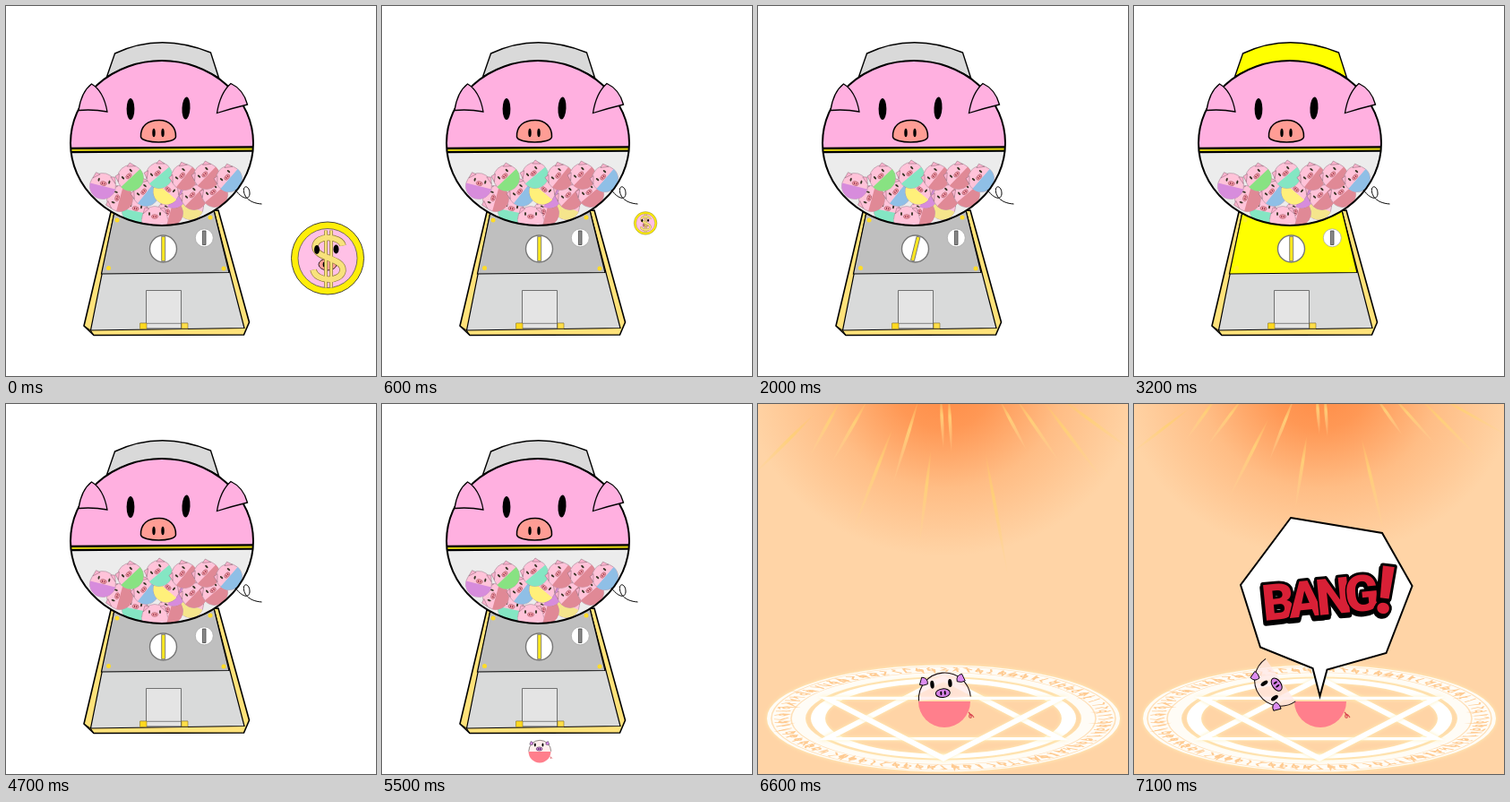
Recreate the animation shown at these times as an HTML page with a canvas. Size 413 px wide and 413 px high, loop 8600 ms.

```html
<!DOCTYPE html>
<html lang="en">
<head>
<meta charset="utf-8">
<title>Piggy capsule machine</title>
<style>
html, body { margin: 0; width: 100%; height: 100%; overflow: hidden; background: #fff; }
canvas { display: block; width: 100vw; height: 100vh; }
</style>
</head>
<body>
<canvas id="stage" width="413" height="413"></canvas>
<script>
const ctx = document.getElementById('stage').getContext('2d');
const SIZE = 413, LOOP = 8600, STEP = 100, TAU = Math.PI * 2;
const INK = '#000', PINK = '#ffb0e0', GOLD = '#ffe27a', LIT = '#ffff00';

function paint(fill, stroke, width = 1) {
  if (fill) { ctx.fillStyle = fill; ctx.fill(); }
  if (stroke) { ctx.strokeStyle = stroke; ctx.lineWidth = width; ctx.stroke(); }
}

function oval(x, y, rx, ry, fill, stroke, width, tilt = 0) {
  ctx.beginPath();
  ctx.ellipse(x, y, rx, ry, tilt, 0, TAU);
  paint(fill, stroke, width);
}

function poly(points, fill, stroke, width) {
  ctx.beginPath();
  points.forEach(([x, y]) => ctx.lineTo(x, y));
  ctx.closePath();
  paint(fill, stroke, width);
}

function box(x, y, w, h, fill, stroke, width) {
  ctx.beginPath();
  ctx.rect(x, y, w, h);
  paint(fill, stroke, width);
}

function shape(d, fill, stroke, width) {
  const path = new Path2D(d);
  if (fill) { ctx.fillStyle = fill; ctx.fill(path); }
  if (stroke) { ctx.strokeStyle = stroke; ctx.lineWidth = width; ctx.stroke(path); }
}

function placed(x, y, angle, scale, draw) {
  ctx.save();
  ctx.translate(x, y);
  ctx.rotate(angle);
  ctx.scale(scale, scale);
  draw();
  ctx.restore();
}

function seeded(seed) {
  return () => (seed = (seed * 16807) % 2147483647) / 2147483647;
}

// ---------- Machine ----------

const ROSE = '#e08996', TEAL = '#84e6c3', BLUE = '#8fbfe6', VIOLET = '#d78cdc';
const CAPSULES = [
  [144, 229, TEAL, 0.2], [206, 224, '#f5e58c', 0.4], [183, 231, ROSE, -1.3],
  [166, 238, '#ffc3d9', 0], [127, 215, ROSE, -1.3], [156, 209, BLUE, -0.9],
  [187, 211, VIOLET, -1.1], [179, 207, '#fff07a', 0.7], [210, 213, ROSE, -0.8],
  [233, 210, ROSE, -0.7], [108, 201, VIOLET, 0.25], [139, 192, '#88e282', -0.75],
  [171, 189, TEAL, -0.7], [199, 191, ROSE, -0.9], [224, 190, ROSE, -0.8],
  [249, 193, BLUE, -0.85]
];

function capsule([x, y, color, angle]) {
  placed(x, y, angle, 1, () => {
    const r = 14.5;
    oval(0, 0, r, r, '#ffc3d9', '#9a8390', 0.5);
    for (const s of [-1, 1]) {
      poly([[s * 13, -6], [s * 11, -13], [s * 6, -12]], '#ffb3cf', '#8a6c78', 0.5);
      oval(s * 6, -6, 1, 2.1, '#332');
    }
    oval(0, -3, 3.6, 2.3, '#f79aa4', '#a05a68', 0.6);
    oval(-1.2, -3, 0.5, 1, '#613');
    oval(1.2, -3, 0.5, 1, '#613');
    ctx.beginPath();
    ctx.arc(0, 0, r, 0, Math.PI);
    paint(color);
  });
}

function base(lit) {
  poly([[117, 230], [87, 357], [98, 367.5], [265.5, 367], [271.5, 353], [237, 228]], GOLD, INK, 1.6);
  poly([[121, 230], [94.5, 362], [266, 359.5], [232, 228]], '#d9dada', INK, 1.2);
  poly([[121, 230], [106.5, 299], [249, 297.5], [232, 228]], lit ? LIT : '#bfbfbf', INK, 1.2);
  for (const [x, y] of [[124, 239], [228, 236], [114.5, 292.5], [243, 293]])
    oval(x, y, 2.5, 2.5, lit ? '#fff02a' : '#ffdc28');
  shape('M87 357L94.5 362L98 367.5', null, INK, 0.9);

  box(156.5, 317.5, 39, 42.5, '#e4e4e4', '#555', 0.8);
  shape('M150 354.3H203M150 360.2H203', null, '#555', 0.7);
  box(149.5, 354, 7.5, 6.5, '#ffd91f', '#8a7420', 0.6);
  box(196, 354, 7, 6, '#ffdf4a', '#8a7420', 0.6);
}

function knob(angle) {
  oval(175.5, 271, 15, 15, '#fff', '#777', 1.4);
  placed(175.7, 271, angle, 1, () => box(-2, -13.7, 4, 27.4, '#ffe81f', '#777', 0.9));
  oval(221.3, 258.8, 10, 10, '#fff', '#aaa', 0.8);
  box(219.4, 251, 3.6, 15.5, '#8a8a8a', '#444', 0.8);
}

function globe() {
  ctx.save();
  ctx.beginPath();
  ctx.ellipse(174, 153, 102, 92, 0, 0, TAU);
  ctx.clip();
  box(70, 58, 210, 102, PINK);
  box(70, 160, 210, 90, '#ececec');
  CAPSULES.forEach(capsule);
  shape('M70 161L280 159.5', null, INK, 6.4);
  shape('M70 161L280 159.5', null, '#d8cc10', 2.2);
  ctx.restore();
  oval(174, 153, 102, 92, null, INK, 2);
}

function machine(lit, turn) {
  base(lit);
  knob(turn);
  shape('M112.5 79L121.5 53Q172 29 228.5 52L237.5 80Q174 44 112.5 79Z', lit ? LIT : '#d9d9d9', INK, 1.4);
  globe();
  shape('M81 116.5Q84 96 95.5 87Q109 95 113 118Q97 115 81 116.5Z', PINK, INK, 1.3);
  shape('M235.5 119.5Q239 97 251 86.5Q265 93 269.5 110Q253 114 235.5 119.5Z', PINK, INK, 1.3);
  oval(139, 115, 4.4, 12, INK);
  oval(201, 114, 4.5, 12.6, INK, null, 0, 0.05);
  shape('M150.5 146C150 134 158 127.5 171 127.5C182 127.5 190 135 189.5 146C189 154 152 154 150.5 146Z', '#ff9d95', INK, 1.5);
  oval(165, 141.5, 1.7, 4.8, INK);
  oval(175, 141.5, 1.7, 4.8, INK);
  shape('M256 205C262 214 271 218 272 210C272.5 203 267 199 265.5 204C264.5 211 270 220 285.5 221', null, INK, 1);
}

function dollar(color, grow) {
  shape('M17 -14C15 -25 -13 -27 -14 -13C-14 1 18 -1 17 14C15 27 -13 27 -16 13', null, color, 6 + grow);
  shape('M-2 -31V33M4 -31V33', null, color, 2.4 + grow);
}

function coin(u) {
  const r = 41 - 42 * u;
  if (r <= 0) return;
  const x = 359 - 138 * Math.pow(u, 1.86);
  const y = 281.5 - 23 * u - 107 * u * (1 - u);
  placed(x, y, 0, r / 41, () => {
    oval(0, 0, 40.5, 40.5, '#ffee0a', '#333', 0.9);
    oval(0, 0, 33, 33, '#ffc0e6', '#555', 0.8);
    oval(0, 7, 10, 6.5, '#ff9f98', INK, 0.8);
    oval(-4, 7, 1.4, 3, INK);
    oval(4, 7, 1.4, 3, INK);
    dollar('#8f7a3a', 1.4);
    dollar('#f8e27c', 0);
    oval(-12, -9.5, 3, 5, INK);
    oval(9.5, -10, 3, 5, INK);
  });
}

// ---------- Prize ball, radius 29, lid hinged at its left edge ----------

function lid() {
  ctx.beginPath();
  ctx.arc(28.5, 0, 29, Math.PI, TAU);
  paint('rgba(255,232,230,.72)', null);
  ctx.beginPath();
  ctx.arc(28.5, 0, 29, Math.PI, TAU);
  paint(null, '#1a1012', 1.1);
  shape('M2 -18L5 -26Q12 -25 11 -18Q6 -16 2 -18Z', '#dc8df0', INK, 0.9);
  shape('M53 -18L50 -26Q43 -25 44 -18Q49 -16 53 -18Z', '#dc8df0', INK, 0.9);
  oval(16, -17, 2.2, 4.5, INK);
  oval(36, -17, 2.2, 4.5, INK);
  oval(27, -6.5, 8, 4.8, '#d583e4', INK, 1);
  oval(25, -6.5, 1, 2.4, INK);
  oval(29.4, -6.5, 1, 2.4, INK);
}

function prize(x, y, scale, open) {
  placed(x, y, 0, scale, () => {
    ctx.beginPath();
    ctx.arc(0, 0, 29, 0, Math.PI);
    paint('#ff7f8c');
    shape('M27 12Q31 16 30 18Q27 19 28 15Q30 13 33 18', null, '#d8434e', 1.1);
    placed(-28, -0.5, -open, 1, lid);
  });
}

// ---------- Summoning scene ----------

// Each ray: start x, start y, end x, end y
const RAYS = [
  [62, 12, -8, 82], [92, -4, 58, 58], [122, -4, 82, 66], [150, 28, 106, 142],
  [179, -4, 151, 88], [193, 52, 180, 158], [204, -8, 207, 50], [213, -8, 216, 54],
  [254, 56, 279, 192], [270, -4, 300, 52], [288, -6, 336, 64], [318, -4, 386, 86],
  [338, -6, 420, 54]
];

function ray([x, y, endX, endY]) {
  const len = Math.hypot(endX - x, endY - y);
  placed(x, y, Math.atan2(endY - y, endX - x), 1, () => {
    const fade = ctx.createLinearGradient(0, 0, len, 0);
    fade.addColorStop(0, 'rgba(255,198,105,.15)');
    fade.addColorStop(0.35, 'rgba(255,208,120,.95)');
    fade.addColorStop(1, 'rgba(255,214,150,.1)');
    shape(`M0 0Q${len * 0.4} -3.6 ${len} 0Q${len * 0.4} 3.6 0 0Z`, fade);
  });
}

function sky(reach) {
  ctx.fillStyle = '#ffd4a6';
  ctx.fillRect(0, 0, SIZE, SIZE);
  ctx.save();
  ctx.translate(207, -20);
  ctx.scale(1.15, 1);
  const glow = ctx.createRadialGradient(0, 0, 0, 0, 0, 190);
  glow.addColorStop(0, '#ff8b45');
  glow.addColorStop(0.25, '#ff9855');
  glow.addColorStop(0.6, '#ffbd85');
  glow.addColorStop(1, '#ffd4a6');
  ctx.fillStyle = glow;
  ctx.fillRect(-240, 0, 480, 260);
  ctx.scale(1 / 1.15, reach);
  ctx.translate(-207, 20);
  RAYS.forEach(ray);
  ctx.restore();
}

function rune(rnd) {
  ctx.beginPath();
  ctx.moveTo(-4 + rnd() * 3, -8);
  for (let i = 0; i < 3; i++) ctx.lineTo(rnd() * 10 - 5, rnd() * 16 - 8);
  ctx.lineTo(3, 8);
  if (rnd() > 0.5) ctx.arc(0, 1, 3.5, 0, TAU);
  paint(null, '#ffcb92', 2.3);
}

function circles() {
  const rnd = seeded(77);
  ctx.save();
  ctx.translate(207, 351);
  ctx.scale(1, 0.302);
  ctx.lineJoin = 'miter';
  ctx.shadowColor = '#ffefb8';
  ctx.shadowBlur = 4;
  oval(0, 0, 175.5, 175.5, null, '#fffcf6', 43);
  oval(0, 0, 140, 140, null, '#fff', 16);
  for (const dir of [-1, 1])
    poly([[0, dir * 148], [130, -dir * 75], [-130, -dir * 75]], null, '#fff', 11);
  ctx.shadowBlur = 0;
  oval(0, 0, 192, 192, null, '#ffe0b8', 1.6);
  oval(0, 0, 170, 170, null, '#ffe0b8', 1.6);
  const count = 84;
  for (let i = 0; i < count; i++) {
    const a = i / count * TAU;
    placed(Math.cos(a) * 181, Math.sin(a) * 181, a + Math.PI / 2, 1, () => rune(rnd));
  }
  ctx.restore();
}

// Comic lettering: heavy outline below, then letters overlapping left to right
function shout(text, x, y, size, angle) {
  placed(x, y, angle, 1, () => {
    ctx.font = `900 ${size}px Roboto, "Open Sans", sans-serif`;
    ctx.textAlign = 'left';
    ctx.textBaseline = 'alphabetic';
    ctx.lineJoin = 'round';
    const eachLetter = (draw) => {
      let at = 0;
      for (const ch of text) {
        draw(ch, at);
        at += ctx.measureText(ch).width - 7;
      }
    };
    ctx.strokeStyle = INK;
    ctx.lineWidth = 6;
    eachLetter((ch, at) => {
      ctx.strokeText(ch, at - 1, 3);
      ctx.strokeText(ch, at, 0);
    });
    ctx.fillStyle = '#d82036';
    ctx.lineWidth = 3;
    eachLetter((ch, at) => {
      ctx.strokeText(ch, at, 0);
      ctx.fillText(ch, at, 0);
    });
  });
}

function bang() {
  poly([[175, 127], [277, 144], [310.5, 203], [281.5, 278], [215.5, 296.5],
    [207.5, 326], [199.5, 295], [141, 271.5], [119, 202]], '#fff', INK, 2);
  shout('BANG', 145, 242, 56, -0.1);
  shout('!', 267, 232, 74, 0.13);
}

// ---------- Timeline ----------

function halfTurn(u) {
  const p = 2.3;
  return Math.PI * (u < 0.5 ? Math.pow(2 * u, p) / 2 : 1 - Math.pow(2 - 2 * u, p) / 2);
}

function knobAngle(t) {
  if (t < 900 || t >= 2700) return 0;
  return halfTurn(((t - 900) % 900) / 900);
}

function draw(t) {
  ctx.clearRect(0, 0, SIZE, SIZE);
  if (t < 5600) {
    const lit = (t >= 3200 && t < 3700) || (t >= 4200 && t < 4700);
    ctx.fillStyle = '#fff';
    ctx.fillRect(0, 0, SIZE, SIZE);
    machine(lit, knobAngle(t));
    if (t < 1000) coin(t / 900);
    if (t >= 5200) prize(176, 388 - (5500 - t) * 0.14, 0.43, 0);
    return;
  }
  const u = Math.min(1, Math.max(0, (t - 6500) / 600));
  sky(1 - 0.23 * Math.max(0, (u * 6 - 1) / 5));
  circles();
  prize(208, 332, 1, 125 * Math.pow(u, 1.8) * Math.PI / 180);
  if (t >= 7100) bang();
}

const begin = performance.now();
function tick() {
  const t = (performance.now() - begin) % LOOP;
  draw(Math.floor(t / STEP) * STEP);
  requestAnimationFrame(tick);
}
tick();
</script>
</body>
</html>
```
